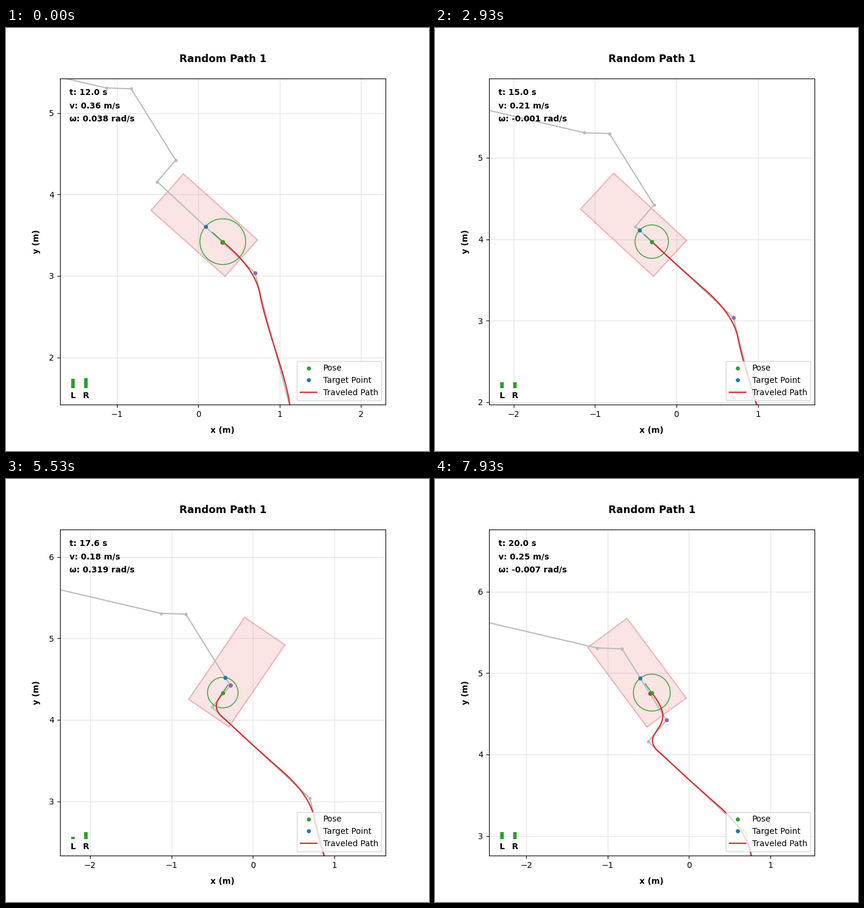
Recreate the animation shown at these times as a matplotlib script. Size 720 by 720 pixels, loop 8 s.

```python
import numpy as np
import matplotlib.pyplot as plt
from matplotlib.animation import FuncAnimation
from matplotlib.patches import Circle, Polygon, Rectangle
from matplotlib.ticker import MultipleLocator

TICKS, TICK_MS = 160, 50
FPS, STATES, SUB = 15, 120, 10      # robot states per second, in total, substeps
T0 = 12 + 1 / 30
VIEW = 2.0                          # half width of the camera window, m
HALF_TRACK = 0.3
BODY_LEN, BODY_W, BODY_SHIFT = 1.219, 0.6, 0.305
MAX_TURN, TURN_ACC, ACC = np.pi / 4, 2.2, 0.4
GREEN, RED, BLUE, PURPLE, GREY = "#2ca02c", "#d62728", "#1f77b4", "#9467bd", "#bbbbbb"

WAYPOINTS = np.array([(1.218, 1.038), (0.698, 3.038), (-0.503, 4.157),
                      (-0.277, 4.422), (-0.824, 5.298), (-1.130, 5.308),
                      (-4.130, 6.010)])

# Key poses: state, x, y, heading in degrees
KEYS = np.array([(0, .302, 3.421, 138.3), (44, -.303, 3.971, 137.3),
                 (60, -.430, 4.102, 117.25), (73, -.444, 4.209, 78.85),
                 (93, -.329, 4.435, 72.8), (119, -.458, 4.760, 126.6)])
KEYS[:, 3] = np.radians(KEYS[:, 3])


def bezier(a, b, c, d):
    s = np.linspace(0, 1, 40)[:, None]
    a, b, c, d = map(np.array, (a, b, c, d))
    return (1-s)**3 * a + 3*s*(1-s)**2 * b + 3*s*s*(1-s) * c + s**3 * d


# Route driven before the clip starts
past = np.vstack([
    bezier((1.137, 1.20), (1.16, 1.62), (.86, 2.24), (.757, 2.78)),
    bezier((.757, 2.78), (.71, 3.04), (.495, 3.26), (.302, 3.421))])


def lookahead(v):
    return 0.1 + 0.5 * v


def distance_left(pos, seg):
    return np.hypot(*(WAYPOINTS[seg + 1] - pos))


def pursue(pos, seg, reach):
    """Closest point and lookahead target on a path segment."""
    a, b = WAYPOINTS[seg:seg + 2]
    length = np.hypot(*(b - a))
    u = (b - a) / length
    along = (pos - a) @ u
    gap = np.hypot(*(a + along * u - pos))
    far = along + np.sqrt(max(reach**2 - gap**2, 0))
    return a + np.clip(along, 0, length) * u, a + np.clip(far, 0, length) * u


def drive():
    """Pure pursuit: slow down near corners and for tight curves."""
    dt = 1 / (FPS * SUB)
    pos, th = KEYS[0, 1:3].copy(), KEYS[0, 3]
    seg, w = 1, 0.038
    v = 0.16 + 0.185 * distance_left(pos, seg)
    log = []
    for _ in range((STATES - 1) * SUB + 1):
        log.append((*pos, th, v, w))
        reach = lookahead(v)
        if distance_left(pos, seg) < reach:
            seg += 1
        dx, dy = pursue(pos, seg, reach)[1] - pos
        curve = 2 * np.sin(np.arctan2(dy, dx) - th) / reach
        goal = min(0.16 + 0.185 * distance_left(pos, seg),
                   MAX_TURN / max(abs(curve), 1e-6))
        v = min(goal, v + ACC * dt)
        turn = np.clip(v * curve, -MAX_TURN, MAX_TURN)
        w += np.clip(turn - w, -TURN_ACC * dt, TURN_ACC * dt)
        th += w * dt
        pos = pos + v * dt * np.array([np.cos(th), np.sin(th)])
    return np.array(log)


log = drive()
steps = np.arange(len(log)) / SUB
for col in range(3):        # spread the drift between key poses
    drift = KEYS[:, col + 1] - np.interp(KEYS[:, 0], steps, log[:, col])
    log[:, col] += np.interp(steps, KEYS[:, 0], drift)
track = log[:, :2]
heading, speed, turning = log[:, 2:].T

segment = np.empty(len(log), int)
seg = 1
for k, pos in enumerate(track):
    seg += distance_left(pos, seg) < lookahead(speed[k])
    segment[k] = seg


fig = plt.figure(figsize=(7.2, 7.2), dpi=100, facecolor="white")
ax = fig.add_subplot()
ax.set_aspect("equal")
ax.set_axisbelow(True)
ax.grid(color="#e3e3ea", lw=0.8)
for axis in (ax.xaxis, ax.yaxis):
    axis.set_major_locator(MultipleLocator(1))
ax.set_title("Random Path 1", fontsize=12.5, fontweight="bold", pad=20.5)
ax.set_xlabel("x (m)", fontweight="bold", labelpad=10)
ax.set_ylabel("y (m)", fontweight="bold", labelpad=10)


def dot(color, z, label=None):
    return ax.plot([], [], "o", color=color, ms=4, zorder=z, label=label)[0]


body = ax.add_patch(Polygon(np.zeros((4, 2)), closed=True, lw=1.5, zorder=1,
                            fc=(.84, .15, .16, .12), ec=(.84, .15, .16, .3)))
ax.plot(*WAYPOINTS.T, "o-", color=GREY, lw=1.5, ms=3, zorder=2)
ring = ax.add_patch(Circle((0, 0), 1, fill=False, ec=GREEN, lw=1, zorder=3))
nose, = ax.plot([], [], color=GREEN, lw=1.1, zorder=3)
nearest = dot(RED, 3.2)
passed = dot(PURPLE, 3.3)
pose = dot(GREEN, 3.5, "Pose")
target = dot(BLUE, 3.5, "Target Point")
trail, = ax.plot([], [], color=RED, lw=1.5, zorder=3.1, label="Traveled Path")
ax.legend(loc="lower right")


def note(x, y, s="", ha="left"):
    return ax.text(x, y, s, ha=ha, va="baseline", fontweight="bold",
                   transform=ax.transAxes, zorder=4)


readout = [note(.03, y) for y in (.95, .91, .87)]
bars = []
for x, name in ((.04, "L"), (.08, "R")):
    bars.append(ax.add_patch(Rectangle((x - .005, .05), .01, 0, lw=0, zorder=4,
                                       transform=ax.transAxes)))
    note(x, .0195, name, "center")


def draw(tick):
    # Nearest robot state, so the motion keeps its 15 steps per second
    k = int(tick * TICK_MS * FPS / 1000 + 0.5) * SUB
    pos, th, v, w = track[k], heading[k], speed[k], turning[k]
    reach = lookahead(v)
    ahead = np.array([np.cos(th), np.sin(th)])
    side = np.array([-ahead[1], ahead[0]]) * BODY_W / 2
    ax.set_xlim(pos[0] - VIEW, pos[0] + VIEW)
    ax.set_ylim(pos[1] - VIEW, pos[1] + VIEW)

    front = pos + ahead * (BODY_SHIFT + BODY_LEN / 2)
    back = pos + ahead * (BODY_SHIFT - BODY_LEN / 2)
    body.set_xy([front + side, front - side, back - side, back + side])
    ring.set_center(pos)
    ring.set_radius(reach)
    nose.set_data(*np.array([pos, pos + 0.6 * reach * ahead]).T)
    trail.set_data(*np.vstack([past, track[:k + 1]]).T)

    close, aim = pursue(pos, segment[k], reach)
    for mark, p in ((nearest, close), (target, aim), (pose, pos),
                    (passed, WAYPOINTS[segment[k]])):
        mark.set_data([p[0]], [p[1]])

    for bar, wheel in zip(bars, (v - w * HALF_TRACK, v + w * HALF_TRACK)):
        bar.set_height(wheel / 12)
        bar.set_facecolor(GREEN if wheel >= 0 else RED)
    t = T0 + k / (FPS * SUB)
    for line, s in zip(readout, (f"t: {t:.1f} s", f"v: {v:.2f} m/s",
                                 f"ω: {round(w, 3) + 0:.3f} rad/s")):
        line.set_text(s)
    return []


anim = FuncAnimation(fig, draw, frames=TICKS, interval=TICK_MS,
                     init_func=lambda: draw(0), repeat=True, repeat_delay=0)
plt.show()
```
